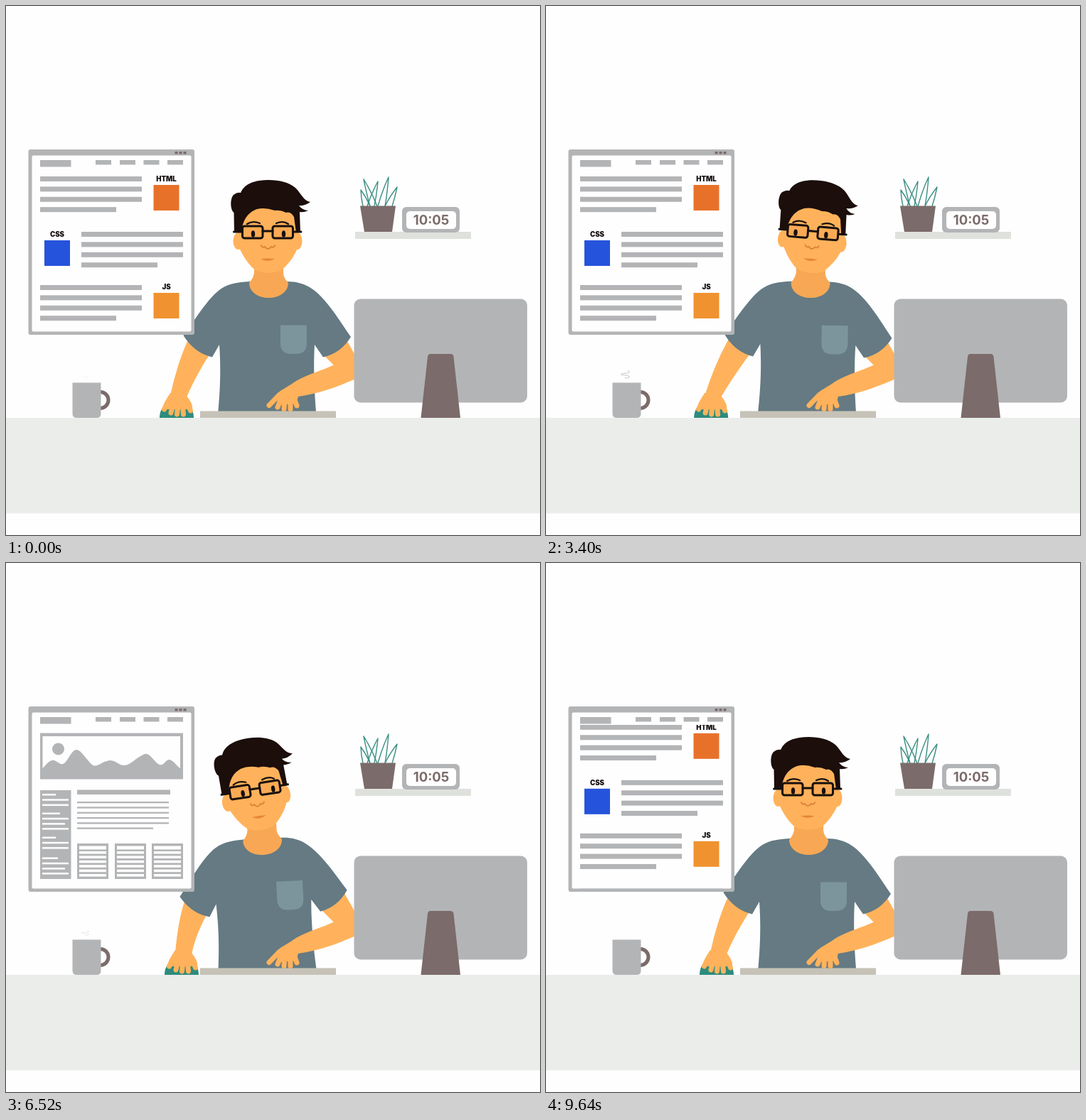
An HTML page for the animation above (9.68 s loop, 751x745 px).

```html
<!DOCTYPE html>
<html lang="en">
<head>
<meta charset="utf-8">
<title>Developer at a desk</title>
<style>
  html, body { margin: 0; width: 100%; height: 100%; overflow: hidden; background: #fefefe; }
  svg { display: block; width: 100%; height: 100%; }
  text { font-family: Inter, "Open Sans", sans-serif; text-anchor: middle; }
  .label { font-size: 9.7px; font-weight: 900; fill: #15100f; }
  .grey { fill: #b3b4b6; }
  .brown { fill: #7b6b6a; }
  .skin { fill: #ffb25b; }
  .finger { stroke: #ffb25b; stroke-width: 7; stroke-linecap: round; fill: none; }
  .ink { stroke: #17100e; fill: none; stroke-linecap: round; }
</style>
</head>
<body>
<svg viewBox="0 0 751 745">
  <defs>
    <clipPath id="view"><rect x="37" y="228" width="223" height="230.5"/></clipPath>
  </defs>
  <rect width="751" height="745" fill="#fefefe"/>

  <!-- shelf -->
  <g id="leaves" fill="none" stroke="#3a8f84" stroke-width="1.4" stroke-linejoin="round"></g>
  <path class="brown" d="M498 281.5H548L543 318H504Z"/>
  <rect x="491" y="318" width="163" height="10" fill="#dfe1dd"/>
  <rect class="grey" x="557" y="283" width="81" height="36" rx="6"/>
  <rect x="563" y="289" width="70" height="25" rx="5" fill="#fefefe"/>
  <text class="brown" x="598" y="308" font-size="18.5" font-weight="650">10:05</text>

  <!-- desk -->
  <rect y="580" width="751" height="134.5" fill="#eaedea"/>
  <circle cx="132.5" cy="555" r="11.5" fill="none" stroke="#7b6b6a" stroke-width="5"/>
  <path class="grey" d="M93.5 530.5H133.5V574Q133.5 580 127.5 580H99.5Q93.5 580 93.5 574Z"/>
  <path id="steam" fill="none" stroke="#776b6a" stroke-width="2.3" stroke-linecap="round"
    d="M118 503.5C122 505 121 509 115 510C107 511 102 511 102 513.5C102 516 108 516 113 516C121 516 122 521 118 523C115 524.5 112 523.5 111 522"/>

  <!-- person -->
  <path class="skin" d="M430 466L472 458L490 490V522L462 520V507L440 485Z"/>
  <path id="mouse" fill="#2d8c7d" d="M216 580C216 548 264 548 264 580Z"/>
  <path id="arm" class="skin"/>
  <g id="torso">
    <path fill="#657a83" d="M343 388C322 389 310 392 300 400C281 415 262 448 249.5 464Q265 489 290 494.5L300 477C303 520 300 552 298 576H436.5C434 550 432 510 434 477L446 494.5Q471 489 485 466C471 446 451 412 430 398C420 391 408 388 395 388Z"/>
    <path fill="#7c959d" d="M386 449.5H423V475Q423 490 408 490H401Q386 490 386 475Z"/>
    <path fill="#f8a855" d="M349 362H390V374C390 382 393 385 397 390C396 418 343 418 342 390C346 385 349 380 349 374Z"/>
    <g id="head">
      <g class="skin">
        <ellipse cx="326.5" cy="331" rx="7" ry="12"/>
        <ellipse cx="410" cy="331" rx="6.5" ry="12"/>
        <path d="M327 290V338C332 350 339 361 347 369C355 378 383 378 391 369C400 360 407 350 411 338V272H340Z"/>
      </g>
      <path fill="#1b0e0b" d="M321 319L320.5 291C315 287 315 271 320 266Q325 262 330 263C334 253 344 248 356 246C376 243 398 247 408 257C415 264 418 274 428 276Q420 282 412 281Q417 288 425 288Q419 291 413 290L414 319H408L405 297Q400 289 394 291Q386 287 378 288Q364 283 353 286C342 290 333 299 331 319Z"/>
      <g fill="#fbaa54" stroke="#17100e" stroke-width="3">
        <rect x="332.5" y="310" width="28.5" height="17" rx="3"/>
        <rect x="375" y="310" width="28.5" height="17" rx="3"/>
      </g>
      <path class="ink" stroke-width="3" d="M361 317H375M320.5 318H332M404 318H415"/>
      <path class="ink" stroke-width="2.2" d="M339 307Q347 302 357 306M380 306Q390 302 397 307"/>
      <g id="eyes" fill="#17100e">
        <ellipse cx="346.5" cy="321" rx="2.7" ry="4.7"/>
        <ellipse cx="389.5" cy="321" rx="2.7" ry="4.7"/>
      </g>
      <path id="lids" class="ink" stroke-width="2" d="M342 321Q347 323 352 320M384 321Q389 323 394 320"/>
      <path fill="none" stroke="#df843b" stroke-width="2" stroke-linecap="round" d="M359 337Q360 341 364 339Q368 345 373 339Q377 341 378 337"/>
      <path fill="#e5863c" d="M358 356Q368 355 378 356Q368 362 358 356Z"/>
    </g>
  </g>
  <g id="hand">
    <path class="skin" d="M231 545L254 549C260 557 263 562 262 568H220C221 560 226 553 231 545Z"/>
    <path class="finger" d="M229 556L222.5 568M235 560L232 573M242 560L240.5 575M248 558L249.5 575M254 556L259.5 570"/>
  </g>
  <rect x="273" y="570.5" width="191" height="9.5" fill="#c6c2b7"/>
  <path class="skin" d="M492 490L460 506C440 515 418 521 405 530C396 537 384 541 379 549L384 562L408 560L411 550C440 546 464 537 492 525Z"/>
  <path class="finger" d="M384 548L370 562.5M386 555L382 565M392 553L391 567.5M400 553L400 567.5M405 552L409 563"/>

  <!-- monitor -->
  <rect class="grey" x="489.5" y="412.5" width="243.5" height="146" rx="9"/>
  <path class="brown" d="M597 490H625Q629 490 629.5 494L639 580H583.5L593 494Q593.5 490 597 490Z"/>

  <!-- browser window -->
  <rect class="grey" x="31.5" y="202" width="233.5" height="261" rx="3"/>
  <rect x="36.5" y="210.5" width="224" height="248" rx="2" fill="#fefefe"/>
  <path class="brown" d="M237.5 205h4v3.5h-4zM243.5 205h4v3.5h-4zM249.5 205h4v3.5h-4z"/>
  <path class="grey" d="M48 217h43.500v9.500H48zM126 217h22v6.500h-22zM160 217h22v6.500h-22zM193.500 217h22v6.500h-22zM227 217h22v6.500h-22z"/>
  <g clip-path="url(#view)">
    <g id="article"></g>
    <g id="layout"></g>
  </g>
</svg>

<script>
const $ = id => document.getElementById(id);
const rect = (x, y, w, h, fill = '#b3b4b6') =>
  `<rect x="${x}" y="${y}" width="${w}" height="${h}" fill="${fill}"/>`;
const WHITE = '#fefefe';

function paragraph(x, y) {
  return [143, 143, 143, 107].map((w, i) => rect(x, y + i * 14.4, w, 7)).join('');
}

function badge(name, x, y, color) {
  return `<text class="label" x="${x}" y="${y}">${name}</text>` +
    rect(x - 18, y + 5, 36, 36, color);
}

function buildArticle() {
  return paragraph(48, 240) + badge('HTML', 225.5, 247, '#e8712a') +
    paragraph(106, 318) + badge('CSS', 72, 325, '#2553dc') +
    paragraph(48, 393) + badge('JS', 225.5, 399, '#f0922f');
}

function buildLayout() {
  let out = rect(48, 239.5, 201, 65) + rect(51.5, 244, 193.5, 57, WHITE) +
    '<circle cx="73.5" cy="262" r="8.5" class="grey"/>' +
    '<path class="grey" d="M51 290C58 282 62 277 68 278C75 281 78 287 84 280' +
    'C90 272 94 262 100 263C106 264 114 278 121 284C128 289 134 280 142 279' +
    'C149 276 155 281 161 284C173 289 180 275 195 269C202 267 207 278 214 283' +
    'C222 288 224 276 230 277C236 278 240 286 246 290V302H51Z"/>';
  out += rect(48, 320, 43.5, 125);
  [19, 25, 19, 22].forEach((w, i) => {
    const y = [325, 351.5, 385.5, 414.5][i];
    out += rect(51, y, w, 2.5, WHITE) + rect(51, y + 7.3, 37, 2.5, WHITE) +
      rect(51, y + 14.6, i % 2 ? 32 : 37, 2.5, WHITE);
    if (i % 2) out += rect(51, y + 21.6, 37, 2.5, WHITE);
  });
  out += rect(100, 319.5, 131, 6.5);
  for (let i = 0; i < 6; i++) out += rect(100, 336 + i * 7.3, i < 5 ? 129 : 107, 2.3);
  for (const x of [100, 153, 205]) {
    out += rect(x, 395, 44, 50) + rect(x + 3, 398.5, 38, 5, WHITE);
    for (let i = 0; i < 6; i++) out += rect(x + 3, 406 + i * 6.4, 38, 3.6, WHITE);
  }
  return out;
}

function leaf(x, tx, ty) {
  const my = (282 + ty) / 2, mx = x * 0.55 + tx * 0.45;
  return `<path d="M${x - 5} 282Q${mx - 4} ${my} ${tx} ${ty}Q${mx + 4} ${my} ${x + 5} 282"/>`;
}

$('article').innerHTML = buildArticle();
$('layout').innerHTML = buildLayout();
$('leaves').innerHTML = leaf(507, 499, 259) + leaf(517, 503, 244) + leaf(513, 523, 247) +
  leaf(528, 538, 241) + leaf(538, 550, 255);

const LOOP = 9680, SWAY = LOOP / 2, PUFF = LOOP / 3;
const SCROLL = 231, SCROLL_MS = 740, SCROLL_OUT = 3860, SCROLL_BACK = LOOP - SCROLL_MS;

const lean = [[0, 0], [1210, -2.8], [1800, -2.8], [3800, 1.2], [SWAY, 0]];
const nod = [[0, 0], [1210, -6], [1800, -6], [3400, 4], [3640, 4], [SWAY, 0]];
const gaze = [[0, 1], [1210, 4], [1800, 4], [3630, -3], [SWAY, 1]];
const slide = [[0, 0], [600, 0], [1900, 7.5], [3500, -8], [SWAY, 0]];
const puffW = [[0, 0.48], [200, 0.64], [1200, 0.97], [2000, 1.13], [PUFF, 1.22]];
const puffH = [[0, 0.2], [200, 0.56], [1200, 0.98], [2000, 1.13], [PUFF, 1.25]];
const puffA = [[0, 0.05], [170, 0.3], [800, 1], [1700, 1], [2700, 0], [PUFF, 0]];

const linear = u => u;
const smooth = u => (1 - Math.cos(Math.PI * u)) / 2;
const clamp = u => Math.max(0, Math.min(1, u));

function at(keys, t, ease = smooth) {
  let i = 1;
  while (i < keys.length - 1 && t > keys[i][0]) i++;
  const [t0, a] = keys[i - 1], [t1, b] = keys[i];
  return a + (b - a) * ease(clamp((t - t0) / (t1 - t0)));
}

const HIP = [368, 571];
function turn(x, y, deg) {
  const r = deg * Math.PI / 180, dx = x - HIP[0], dy = y - HIP[1];
  return [HIP[0] + dx * Math.cos(r) - dy * Math.sin(r), HIP[1] + dx * Math.sin(r) + dy * Math.cos(r)];
}

const move = (id, value) => $(id).setAttribute('transform', value);

function drawPerson(t) {
  const a = at(lean, t), m = at(slide, t);
  move('torso', `rotate(${a} ${HIP})`);
  move('head', `rotate(${at(nod, t)} 369 372)`);
  move('eyes', `translate(${at(gaze, t)} 0)`);
  const blink = t > 1290 && t < 1450;
  $('eyes').style.display = blink ? 'none' : '';
  $('lids').style.display = blink ? '' : 'none';

  const outer = turn(257, 468, a), inner = turn(288, 488, a);
  const k = (outer[0] - 257 + m) / 2;
  $('arm').setAttribute('d', `M${outer}Q${241 + k} 502 ${231 + m} 549L${254 + m} 551` +
    `Q${266 + k} 522 ${inner}Z`);
  move('mouse', `translate(${m} 0)`);
  move('hand', `translate(${m} 0)`);
}

function drawSteam(t) {
  const w = at(puffW, t, linear), h = at(puffH, t, linear);
  move('steam', `translate(111.5 524.5) scale(${w} ${h}) translate(-111.5 -524.5)`);
  $('steam').style.opacity = at(puffA, t, linear);
}

function drawPages(t) {
  const out = clamp((t - SCROLL_OUT) / SCROLL_MS);
  const back = clamp((t - SCROLL_BACK) / SCROLL_MS);
  move('article', `translate(0 ${SCROLL * (t < SCROLL_BACK ? out : back - 1)})`);
  move('layout', `translate(0 ${SCROLL * (out - 1 + back)})`);
}

const start = performance.now();
function frame() {
  const t = (performance.now() - start) % LOOP;
  drawPerson(t % SWAY);
  drawSteam(t % PUFF);
  drawPages(t);
  requestAnimationFrame(frame);
}
frame();
</script>
</body>
</html>
```
